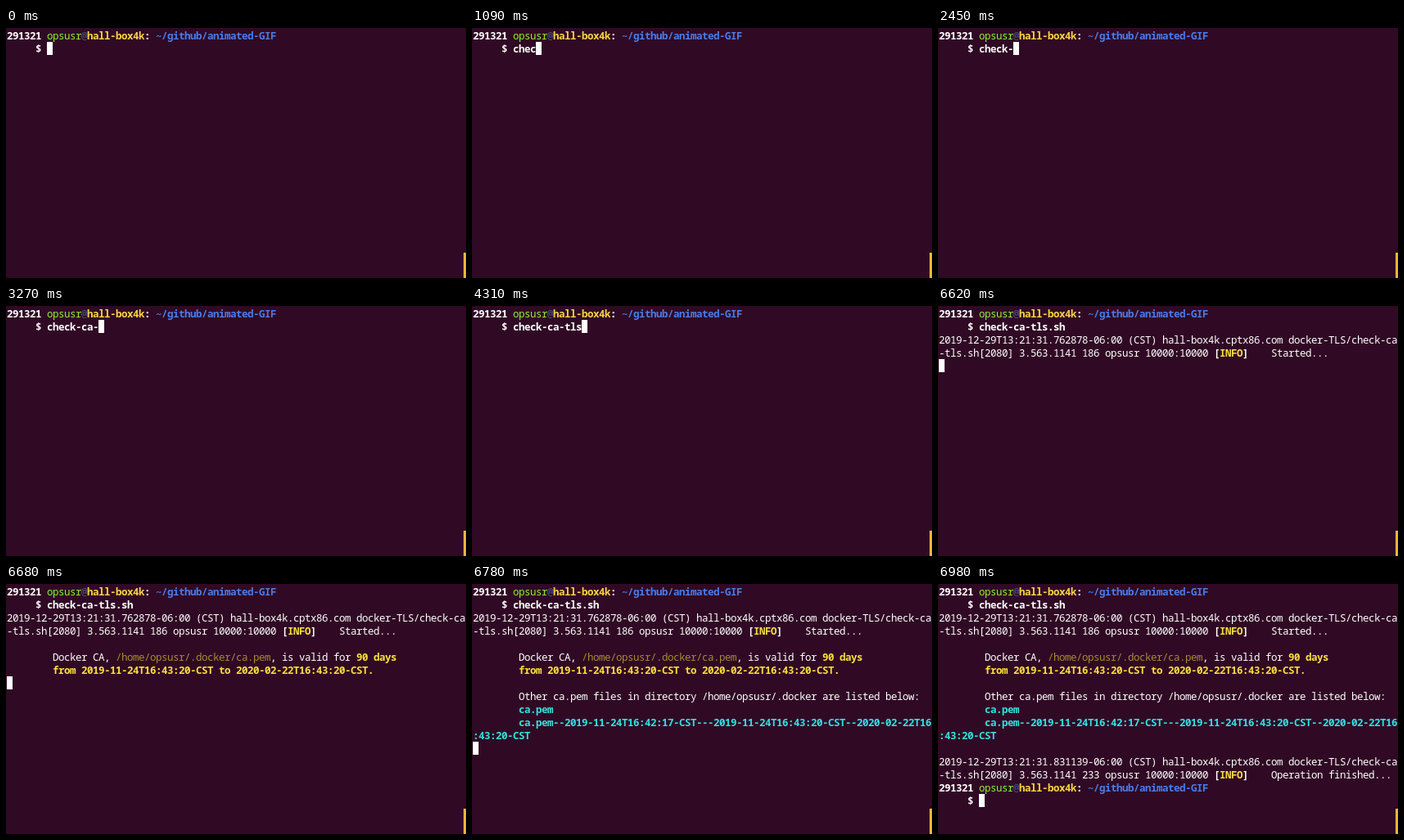
An HTML page for the animation above (8000 ms loop, 562x306 px).

```html
<!DOCTYPE html>
<html lang="en">
<head>
<meta charset="utf-8">
<title>Terminal session</title>
<style>
  html, body { margin: 0; width: 100%; height: 100%; overflow: hidden; background: #300a24; }
  #term { position: relative; width: 562px; height: 306px; overflow: hidden; background: #300a24; }
  .row {
    position: absolute; left: 1px; height: 16px; margin-top: 1px; white-space: pre;
    font: 12.5px/16px "Noto Sans Mono", "DejaVu Sans Mono", monospace;
    font-variant-ligatures: none; color: #fff;
  }
  .row, .row span { letter-spacing: calc(7px - 1ch); }
  .bold { font-weight: 700; }
  .user { font-weight: 500; color: #8ff032; }
  .at { color: #4a5a86; }
  .host { font-weight: 700; color: #fcd444; }
  .path { font-weight: 600; color: #4a7cea; }
  .yellow { font-weight: 700; color: #fce03c; }
  .dim { color: #a58c36; }
  .cyan { font-weight: 700; color: #34e2e2; }
  #cursor { position: absolute; width: 7px; height: 16px; background: #fff; }
  #bar { position: absolute; left: 559px; top: 275px; width: 3px; height: 31px; background: #fbb238; }
</style>
</head>
<body>
<div id="term"><div id="cursor"></div><div id="bar"></div></div>
<script>
const LOOP = 8000, CELL_W = 7, CELL_H = 16, PAD = 1;
const USER = "opsusr", HOST = "hall-box4k", COMMAND = "check-ca-tls.sh";

const prompt = [
  ["291321 ", "bold"], [USER, "user"], ["@", "at"], [HOST, "host"],
  [": ", "bold"], ["~/github/animated-GIF", "path"]
];
const logHead = time => [[`2019-12-29T13:21:31.${time}-06:00 (CST) ${HOST}.cptx86.com docker-TLS/check-ca`]];
const logTail = (line, message) => [
  [`-tls.sh[2080] 3.563.1141 ${line} ${USER} 10000:10000 `],
  ["[", "bold"], ["INFO", "yellow"], ["]", "bold"], ["    " + message]
];
const tab = " ".repeat(8);

const lines = [
  prompt,
  [["     $ ", "bold"], ["", "bold"]],
  logHead("762878"),
  logTail(186, "Started..."),
  [],
  [[tab + "Docker CA, "], [`/home/${USER}/.docker/ca.pem`, "dim"], [", is valid for "], ["90 days", "yellow"]],
  [[tab + "from 2019-11-24T16:43:20-CST to 2020-02-22T16:43:20-CST.", "yellow"]],
  [],
  [[`${tab}Other ca.pem files in directory /home/${USER}/.docker are listed below:`]],
  [[tab + "ca.pem", "cyan"]],
  [[tab + "ca.pem--2019-11-24T16:42:17-CST---2019-11-24T16:43:20-CST--2020-02-22T16", "cyan"]],
  [[":43:20-CST", "cyan"]],
  [],
  logHead("831139"),
  logTail(233, "Operation finished..."),
  prompt,
  [["     $ ", "bold"]]
];

// Start time of each keystroke and whether the cursor block is lit after it
const keys = [
  [0, 1], [500, 0], [670, 0], [840, 1], [1090, 1], [1430, 0], [2450, 1], [2750, 1],
  [3000, 0], [3270, 1], [3590, 0], [3820, 0], [4310, 1], [4740, 1], [5130, 1], [5320, 0]
];
// Start time, rows on screen, cursor column on the last row
const output = [[0, 2, 7], [6620, 5, 0], [6680, 8, 0], [6780, 13, 0], [6880, 16, 0], [6980, 17, 7]];

const term = document.getElementById("term");
const cursor = document.getElementById("cursor");

const rows = lines.map((parts, i) => {
  const row = document.createElement("div");
  row.className = "row";
  row.style.top = PAD + i * CELL_H + "px";
  for (const [text, style = ""] of parts) {
    const span = document.createElement("span");
    span.className = style;
    span.textContent = text;
    row.append(span);
  }
  term.insertBefore(row, cursor);
  return row;
});
const typed = rows[1].lastChild;

const lastIndex = (steps, t) => {
  let i = steps.length - 1;
  while (steps[i][0] > t) i--;
  return i;
};

let shown = "";
function render(t) {
  const key = lastIndex(keys, t), step = lastIndex(output, t);
  if (shown === key + "/" + step) return;
  shown = key + "/" + step;

  const [, count, column] = output[step];
  typed.textContent = COMMAND.slice(0, key);
  rows.forEach((row, i) => { row.style.visibility = i < count ? "visible" : "hidden"; });

  const col = step ? column : column + key;
  cursor.style.left = PAD + col * CELL_W + "px";
  cursor.style.top = PAD + (count - 1) * CELL_H + "px";
  cursor.style.visibility = step || keys[key][1] ? "visible" : "hidden";
}

const start = performance.now();
function tick() {
  render((performance.now() - start) % LOOP);
  requestAnimationFrame(tick);
}
tick();
</script>
</body>
</html>
```
